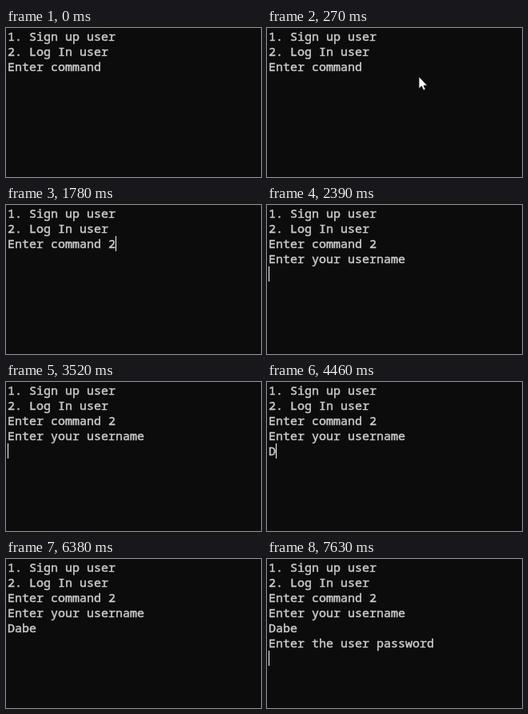
An HTML page that plays this animation: 319x187 px, repeating every 8 s.

```html
<!DOCTYPE html>
<html lang="en">
<head>
<meta charset="utf-8">
<title>Terminal log in</title>
<style>
  html, body { margin: 0; width: 100%; height: 100%; overflow: hidden; background: #0c0c0c; }
  svg { display: block; width: 319px; height: 187px; }
  text {
    font: 15px "Noto Sans Mono", "DejaVu Sans Mono", monospace;
    fill: #ccc; stroke: #ccc; stroke-width: .45px; white-space: pre;
  }
</style>
</head>
<body>
<svg viewBox="0 0 319 187">
  <rect width="319" height="187" fill="#0c0c0c"/>
  <rect y="186" width="319" height="1" fill="#14080b"/>
  <g id="lines"></g>
  <rect id="caret" width="1" height="19" fill="#fff" shape-rendering="crispEdges"/>
  <path id="pointer" d="M0 0V15.2L3.4 12.1L5.8 17.2L8.3 16L6 11.2H10.6Z"
        fill="#fff" stroke="#0c0c0c" stroke-width=".8"/>
  <circle id="click" cx="177" cy="47" r="12" fill="#ff0" fill-opacity=".5"/>
</svg>
<script>
const LOOP = 8000, CELL = 9, ROW = 19, LEFT = 2, TOP = 1;
const $ = id => document.getElementById(id);

const menu = ["1. Sign up user", "2. Log In user", "Enter command "];
const chosen = [...menu.slice(0, 2), "Enter command 2"];
const askName = [...chosen, "Enter your username"];
const named = n => [...askName, "Dabe".slice(0, n)];
const askPassword = [...named(4), "Enter the user password"];

// Start time, lines, caret as [column, row] or null
const screens = [
  [0, menu, null],
  [790, menu, [14, 2]],
  [1310, menu, null],
  [1710, chosen, [15, 2]],
  [2320, askName, null],
  [2390, askName, [0, 4]],
  [2990, askName, null],
  [3520, askName, [0, 4]],
  [4460, named(1), [1, 4]],
  [4860, named(2), [2, 4]],
  [5250, named(3), [3, 4]],
  [5720, named(4), [4, 4]],
  [6380, named(4), null],
  [6710, askPassword, [0, 6]],
  [7370, askPassword, null],
  [7630, askPassword, [0, 6]]
];

// Start time, pointer tip
const moves = [
  [0, null],
  [70, [280, 176]],
  [140, [252, 136]],
  [200, [218, 93]],
  [270, [190, 61]],
  [330, [180, 50]],
  [590, [178, 48]],
  [1780, null]
];

const rows = Array.from({ length: 7 }, (_, i) => {
  const row = document.createElementNS("http://www.w3.org/2000/svg", "text");
  row.setAttribute("x", LEFT);
  row.setAttribute("y", TOP + 15 + i * ROW);
  return $("lines").appendChild(row);
});

const at = (table, t) => table.findLast(step => step[0] <= t);
const show = (el, on) => el.setAttribute("visibility", on ? "visible" : "hidden");

function place(el, pos) {
  show(el, pos);
  if (pos) el.setAttribute("transform", `translate(${pos})`);
}

function draw() {
  const t = performance.now() % LOOP;
  const [, lines, caret] = at(screens, t);
  rows.forEach((row, i) => {
    const line = lines[i] || "";
    if (row.textContent !== line) row.textContent = line;
  });
  place($("caret"), caret && [LEFT + caret[0] * CELL, TOP + caret[1] * ROW]);
  place($("pointer"), at(moves, t)[1]);
  show($("click"), t >= 720 && t < 850);
  requestAnimationFrame(draw);
}
draw();
</script>
</body>
</html>
```
